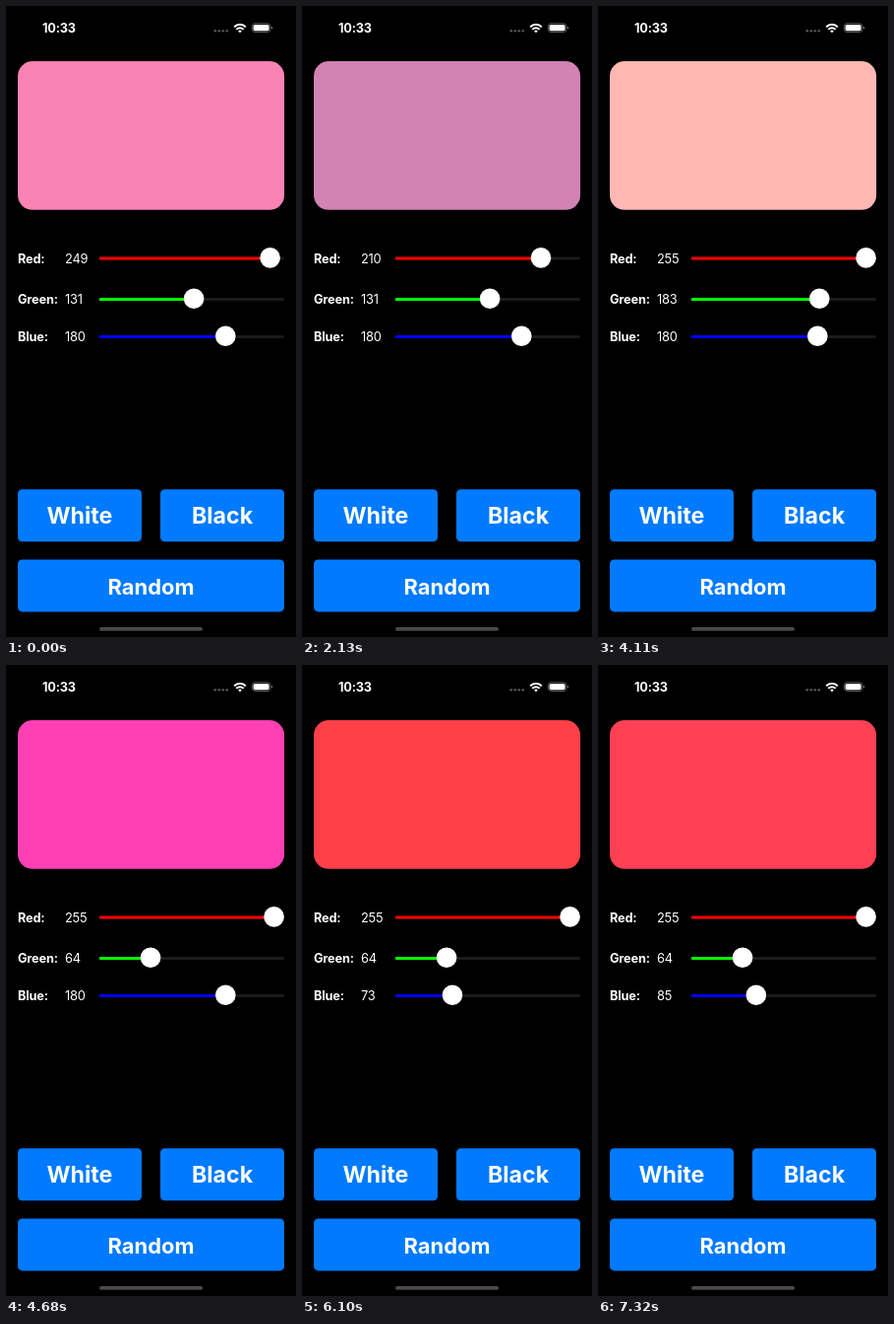
An HTML page for the animation above (8 s loop, 295 by 640 pixels).

```html
<!DOCTYPE html>
<html lang="en">
<head>
<meta charset="utf-8">
<title>Color mixer</title>
<style>
  html, body { margin: 0; width: 100%; height: 100%; overflow: hidden; background: #000; }
  svg { display: block; width: 295px; height: 640px; }
  text { font: 400 12.86px Inter, "Liberation Sans", sans-serif; fill: #fff; }
  .bold { font-weight: 700; font-size: 12.7px; letter-spacing: -.15px; }
  .value { letter-spacing: -.25px; }
  .button { font-weight: 700; font-size: 23.2px; text-anchor: middle; }
  .wide { font-size: 21.9px; }
</style>
</head>
<body>
<svg id="stage" viewBox="0 0 295 640">
  <rect width="295" height="640"/>

  <text class="bold" x="37" y="26.6">10:33</text>
  <g id="dots" fill="#555"></g>
  <g fill="none" stroke="#fff" stroke-width="2">
    <path d="M232.2 21.2a8.2 8.2 0 0 1 11.6 0"/>
    <path d="M234.3 23.8a5.2 5.2 0 0 1 7.4 0"/>
  </g>
  <path d="M236.2 25.4a2.6 2.6 0 0 1 3.6 0L238 27.3z" fill="#fff"/>
  <rect x="250.4" y="17.8" width="18.4" height="8.6" rx="2.7" fill="none" stroke="#777" stroke-width=".8"/>
  <rect x="251.6" y="19" width="16" height="6.2" rx="1.6" fill="#fff"/>
  <path d="M269.9 20.6q1.3.5 1.3 1.5t-1.3 1.5z" fill="#777"/>

  <rect id="card" x="12" y="56.1" width="271.1" height="150.7" rx="15"/>
  <g id="sliders"></g>
  <g id="buttons"></g>
  <rect x="95" y="630" width="105" height="3.8" rx="1.9" fill="#4a4a4a"/>
</svg>
<script>
const LOOP = 8000;
const STEP = 110;
const START = [249, 131, 180];
const TRACK = { x: 94.7, width: 188.2, height: 3, radius: 10.3 };
const [RED, GREEN, BLUE] = [0, 1, 2];

// Each drag changes one channel in even steps, the last one landing on its goal.
const DRAGS = [
  { channel: RED, from: 1400, to: 2130, goal: 210 },
  { channel: RED, from: 3250, to: 3360, goal: 255 },
  { channel: GREEN, from: 3480, to: 3600, goal: 68 },
  { channel: GREEN, from: 3700, to: 4110, goal: 183 },
  { channel: GREEN, from: 4225, to: 4680, goal: 64 },
  { channel: BLUE, from: 5480, to: 5680, goal: 115 },
  { channel: BLUE, from: 5800, to: 6100, goal: 73 },
  { channel: BLUE, from: 6290, to: 6640, goal: 98 },
  { channel: BLUE, from: 6750, to: 7320, goal: 85 }
];

const byId = id => document.getElementById(id);
const card = byId('card');

function add(parent, tag, attrs, text = '') {
  const node = document.createElementNS('http://www.w3.org/2000/svg', tag);
  for (const key in attrs) node.setAttribute(key, attrs[key]);
  node.textContent = text;
  return parent.appendChild(node);
}

function makeButton(name, x, y, width, baseline, style = '') {
  const group = byId('buttons');
  add(group, 'rect', { x, y, width, height: 53, rx: 4.5, fill: '#007aff' });
  add(group, 'text', { class: 'button ' + style, x: x + width / 2, y: y + baseline }, name);
}

function makeSlider(name, color, y) {
  const group = byId('sliders');
  const bar = { x: TRACK.x, y: y - TRACK.height / 2, height: TRACK.height, rx: 1.5 };
  add(group, 'text', { class: 'bold', x: 12, y: y + 4.5 }, name + ':');
  const label = add(group, 'text', { class: 'value', x: 60, y: y + 4.5 });
  add(group, 'rect', { ...bar, width: TRACK.width, fill: '#1b1b1d' });
  const fill = add(group, 'rect', { ...bar, fill: color });
  const thumb = add(group, 'circle', { cy: y - .7, r: TRACK.radius, fill: '#fff' });

  return value => {
    const offset = TRACK.radius + (TRACK.width - 2 * TRACK.radius) * value / 255;
    label.textContent = value;
    fill.setAttribute('width', offset);
    thumb.setAttribute('cx', TRACK.x + offset);
  };
}

for (let i = 0; i < 4; i++) {
  add(byId('dots'), 'circle', { cx: 212.8 + i * 4, cy: 25.2, r: 1.3 });
}

makeButton('White', 12, 490.2, 126, 35);
makeButton('Black', 157, 490.2, 126, 35);
makeButton('Random', 12, 561.4, 271, 35.2, 'wide');

const sliders = [
  makeSlider('Red', '#f00', 256.1),
  makeSlider('Green', '#0f0', 297.5),
  makeSlider('Blue', '#00f', 335.4)
];

function colorAt(time) {
  const color = [...START];
  for (const { channel, from, to, goal } of DRAGS) {
    if (time < from) break;
    const gaps = Math.round((to - from) / STEP);
    const done = Math.min(gaps, Math.floor((time - from) / (to - from) * gaps));
    color[channel] += Math.round((goal - color[channel]) * (done + 1) / (gaps + 1));
  }
  return color;
}

function render(time) {
  const color = colorAt(time);
  card.setAttribute('fill', `rgb(${color})`);
  sliders.forEach((set, i) => set(color[i]));
}

const origin = performance.now();
function tick() {
  render((performance.now() - origin) % LOOP);
  requestAnimationFrame(tick);
}
tick();
</script>
</body>
</html>
```
